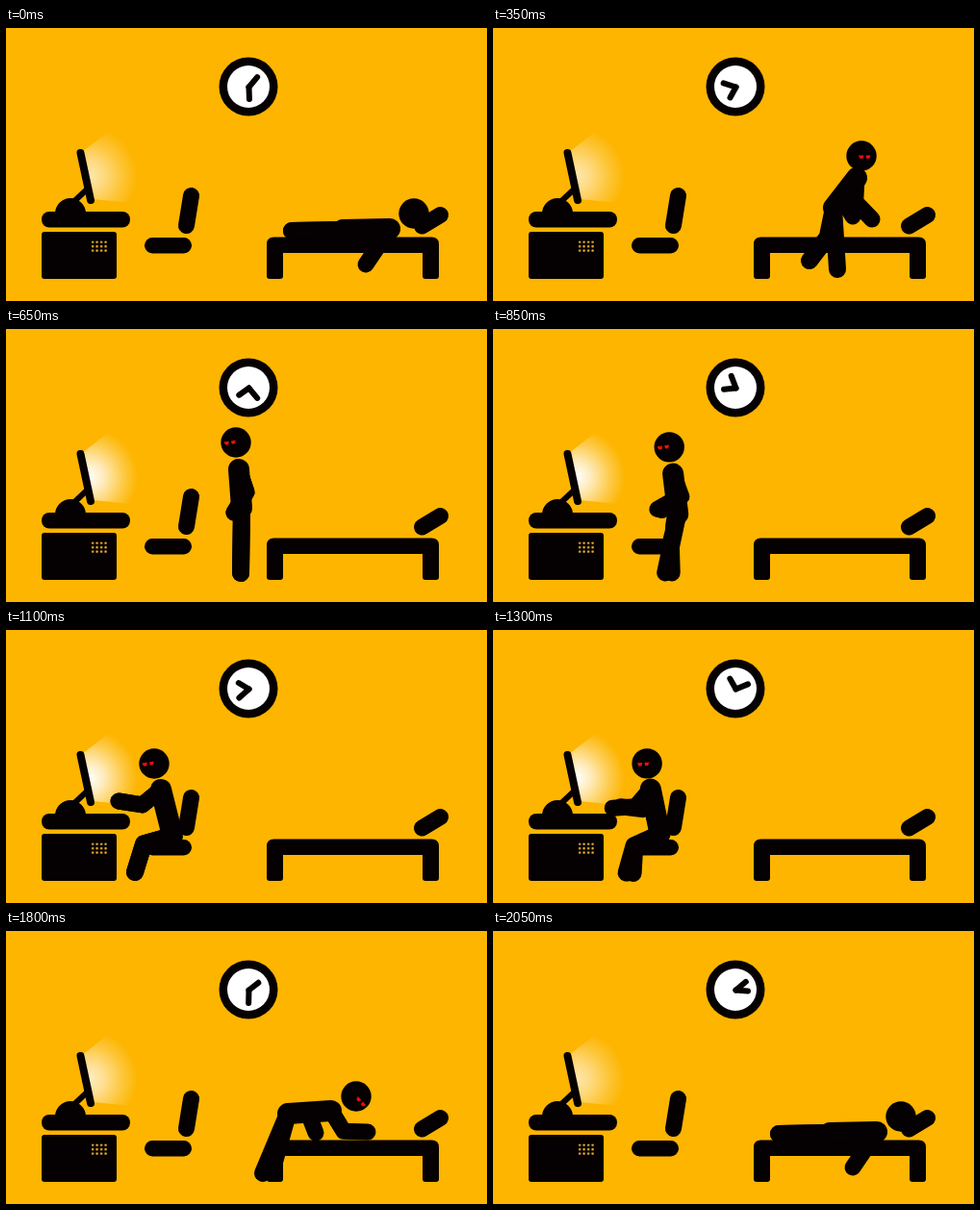
Animation of 500 by 284 pixels, one loop 2100 ms. Source, as an HTML page:

```html
<!DOCTYPE html>
<html lang="en">
<head>
<meta charset="utf-8">
<title>Bed, desk, bed</title>
<style>
  html, body { margin: 0; width: 100%; height: 100%; overflow: hidden; background: #fdb500; }
  svg { display: block; width: 100vw; height: 100vh; }
  .ink { fill: #050001; }
  .line { fill: none; stroke: #050001; stroke-linecap: round; stroke-linejoin: round; }
</style>
</head>
<body>
<svg viewBox="0 0 500 284">
  <defs>
    <radialGradient id="light" gradientUnits="userSpaceOnUse" cx="86" cy="154" r="51">
      <stop offset="0" stop-color="#fff"/>
      <stop offset=".3" stop-color="#fff" stop-opacity=".75"/>
      <stop offset=".7" stop-color="#fff" stop-opacity=".29"/>
      <stop offset="1" stop-color="#fff" stop-opacity="0"/>
    </radialGradient>
    <pattern id="vents" x="88.8" y="221.4" width="4.5" height="4.5" patternUnits="userSpaceOnUse">
      <circle cx="1.3" cy="1.3" r="1.25" fill="#f3b62c"/>
    </pattern>
  </defs>
  <rect width="500" height="284" fill="#fdb500"/>

  <!-- clock -->
  <circle class="ink" cx="252" cy="61" r="30.5"/>
  <circle cx="252" cy="61" r="22" fill="#fff"/>
  <g class="line" stroke-width="6">
    <path id="hour" d="M252.5 61.5v-12.5"/>
    <path id="minute" d="M252.5 61.5v-13.5"/>
  </g>

  <!-- desk -->
  <path id="glow" d="M79 129L110 105L140 116V183L90 178Z" fill="url(#light)"/>
  <path class="line" stroke-width="8" d="M77.5 130L88 179"/>
  <path class="line" stroke-width="6" d="M68 183L84 168"/>
  <path class="ink" d="M51 193a16 16 0 0 1 32 0z"/>
  <rect class="ink" x="37" y="191" width="92" height="16.5" rx="8"/>
  <rect class="ink" x="37" y="212" width="78" height="49" rx="3"/>
  <rect x="88.8" y="221.4" width="17" height="12" fill="url(#vents)"/>

  <!-- chair -->
  <rect class="ink" x="144" y="218" width="49" height="16.5" rx="8.2"/>
  <path class="line" stroke-width="17" d="M192.5 174.5L187.5 205.5"/>

  <!-- bed -->
  <path class="ink" d="M271 261V225q0-7.5 7.5-7.5h164q7.5 0 7.5 7.5v33q0 3-3 3h-11q-3 0-3-3v-24H288v24q0 3-3 3h-11q-3 0-3-3z"/>
  <path class="line" stroke-width="17" d="M432.5 206L451.5 194.5"/>

  <!-- person -->
  <g class="line">
    <path id="torso" stroke-width="22"/>
    <path id="legA" stroke-width="18"/>
    <path id="legB" stroke-width="18"/>
    <path id="armA" stroke-width="17"/>
    <path id="armB" stroke-width="17"/>
  </g>
  <circle class="ink" id="head" r="15.7"/>
  <path id="eyes" fill="#e8100c" d="M-6.5 -1.6h5.4l-.8 3.4h-3.2zM1.1 -1.6h5l-1.4 3.4h-3z"/>
</svg>
<script>
const LOOP = 2100, STEP = 50, THIGH = 31, UPPER_ARM = 25;
const $ = id => document.getElementById(id);

// face: bend direction of the joints, eyes: [shift, tilt], stride and tap: amplitudes
const pose = p => ({ face: 1, eyes: [5, 45], stride: 0, tap: 0, handB: p.handA, footB: p.footA, ...p });

const lie = pose({ face: 0, head: [424, 193], chest: [399, 209], hip: [350, 210],
  handA: [374, 246], handB: [365, 211], footA: [297, 211] });
const rise = pose({ eyes: [3.5, 0], head: [383, 133], chest: [378, 156], hip: [354, 187],
  handA: [394, 199], handB: [374, 196], footA: [329, 242], footB: [358, 251] });
const sit = pose({ face: -1, eyes: [-6, -8], tap: 2.5, head: [154, 139], chest: [161, 166], hip: [173, 214],
  handA: [117, 178], footA: [134, 252] });
const leave = pose({ face: 0, eyes: [5.5, 15], head: [184.5, 138.5], chest: [175, 164], hip: [176, 205],
  handA: [153, 214], handB: [195, 207], footA: [157, 255], footB: [192, 257] });
const lean = pose({ eyes: [5, 48], head: [364, 172], chest: [338, 187], hip: [293, 190],
  handA: [376, 209], handB: [322, 210], footA: [267, 252], footB: [276, 251] });
const walk = (x, dir) => pose({ face: dir, eyes: [6 * dir, 8 * dir], stride: 15,
  head: [x + 3 * dir, 118], chest: [x, 146], hip: [x - 3 * dir, 186],
  handA: [x + 5 * dir, 191], footA: [x - 2 * dir, 254] });

const acts = [
  [0, lie], [50, lie], [350, rise], [450, walk(320, -1)], [650, walk(242, -1)], [820, walk(195, -1)],
  [950, sit], [1250, sit], [1500, leave], [1620, walk(230, 1)], [1700, walk(265, 1)],
  [1800, lean], [2000, lie], [LOOP, lie]
];
// Hour and minute angles
const clock = [[0, [178, 40]], [650, [235, 500]], [1500, [360, 1347]], [2050, [455, 1850]]];

function mix(a, b, k) {
  if (typeof a === 'number') return a + (b - a) * k;
  if (Array.isArray(a)) return a.map((v, i) => mix(v, b[i], k));
  return Object.fromEntries(Object.keys(a).map(n => [n, mix(a[n], b[n], k)]));
}

function at(keys, t) {
  const i = keys.findIndex(k => k[0] > t);
  if (i < 0) return keys[keys.length - 1][1];
  const [t0, a] = keys[i - 1], [t1, b] = keys[i];
  return mix(a, b, (t - t0) / (t1 - t0));
}

// Middle joint between two ends, for two segments of equal length
function joint([x, y], [ex, ey], length, side) {
  const dx = ex - x, dy = ey - y, d = Math.hypot(dx, dy);
  const bend = side * Math.sqrt(Math.max(0, length ** 2 - d * d / 4)) / d;
  return [x + dx / 2 + dy * bend, y + dy / 2 - dx * bend];
}

const trace = (id, ...points) => $(id).setAttribute('d', 'M' + points.join('L'));
const place = (id, value) => $(id).setAttribute('transform', value);

function drawPerson(p, t) {
  const swing = p.stride * Math.sin((p.chest[0] - 242) / 16);
  const tap = p.tap * Math.sin((t - 1100) / 100 * Math.PI);
  for (const [side, sign] of [['A', 1], ['B', -1]]) {
    const [fx, fy] = p['foot' + side], [hx, hy] = p['hand' + side];
    const foot = [fx + sign * swing, fy];
    const hand = [hx - sign * swing * .7, hy + sign * tap];
    trace('leg' + side, p.hip, joint(p.hip, foot, THIGH, p.face), foot);
    trace('arm' + side, p.chest, joint(p.chest, hand, UPPER_ARM, -p.face), hand);
  }
  trace('torso', p.chest, p.hip);

  const [x, y] = p.head, [shift, tilt] = p.eyes;
  place('head', `translate(${x} ${y})`);
  place('eyes', `translate(${x + shift} ${y + 1 + tilt / 10}) rotate(${tilt})`);
  $('eyes').setAttribute('visibility', t >= 150 && t < 1900 ? 'visible' : 'hidden');
}

function draw(t) {
  const person = at(acts, t), [hour, minute] = at(clock, t);
  drawPerson(person, t);
  place('hour', `rotate(${hour} 252.5 61.5)`);
  place('minute', `rotate(${minute} 252.5 61.5)`);
  // The screen dims while the bed is in use
  const away = Math.min(1, Math.max(0, (380 - person.chest[0]) / 140));
  $('glow').setAttribute('opacity', .68 + .32 * away);
}

const start = performance.now();
function tick() {
  const t = (performance.now() - start) % LOOP;
  draw(Math.floor(t / STEP) * STEP);
  requestAnimationFrame(tick);
}
tick();
</script>
</body>
</html>
```
